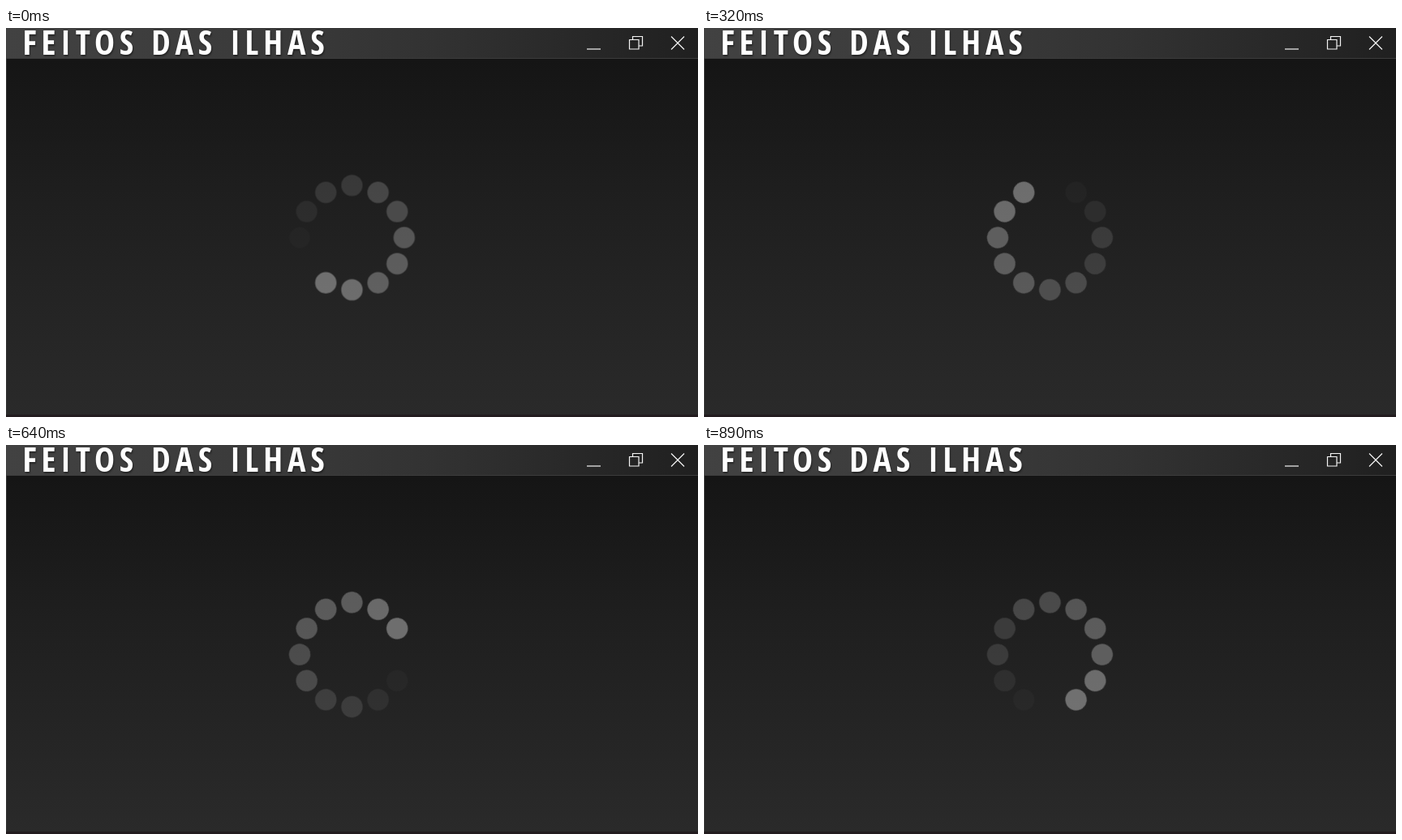
Animation of 853x480 px, one loop 1.02 s. Source, as an HTML page:

```html
<!DOCTYPE html>
<html lang="pt">
<head>
<meta charset="utf-8">
<title>Carregando</title>
<style>
  html, body { margin: 0; width: 100%; height: 100%; overflow: hidden; background: #202020; }
  svg { display: block; width: 853px; height: 480px; }
  #title {
    font: 700 42px "Open Sans Condensed", "Open Sans", "Noto Sans", sans-serif;
    font-stretch: 75%;
    fill: #fff;
    text-shadow: 1px 2px 2px rgba(0, 0, 0, .4);
  }
  .icons { fill: none; stroke: #f4f4f4; stroke-width: 1.2; }
  #ring { fill: #fff; transform-origin: 0 0; animation: spin 1020ms step-end infinite; }
  @keyframes spin {
    0% { transform: rotate(0deg); }
    12.745% { transform: rotate(30deg); }
    25.49% { transform: rotate(90deg); }
    31.372% { transform: rotate(120deg); }
    44.117% { transform: rotate(150deg); }
    50% { transform: rotate(180deg); }
    62.745% { transform: rotate(210deg); }
    68.627% { transform: rotate(240deg); }
    81.372% { transform: rotate(270deg); }
    87.254% { transform: rotate(300deg); }
    100% { transform: rotate(360deg); }
  }
</style>
</head>
<body>
<svg viewBox="0 0 853 480">
  <defs>
    <linearGradient id="body" x2="0" y2="1">
      <stop offset="0" stop-color="#151515"/>
      <stop offset=".4" stop-color="#1f1f1f"/>
      <stop offset="1" stop-color="#2a2a2a"/>
    </linearGradient>
    <linearGradient id="bar">
      <stop offset="0" stop-color="#424242"/>
      <stop offset=".42" stop-color="#393939"/>
      <stop offset=".62" stop-color="#323232"/>
      <stop offset="1" stop-color="#202020"/>
    </linearGradient>
  </defs>
  <rect y="38" width="853" height="442" fill="url(#body)"/>
  <rect width="853" height="38" fill="url(#bar)"/>
  <rect y="37" width="853" height="1" fill="#3c3c3c"/>
  <rect y="38" width="1" height="442" fill="#353535"/>
  <rect y="477" width="853" height="3" fill="#231c1f"/>
  <text id="title" x="20.5" y="33">FEITOS DAS ILHAS</text>
  <g class="icons">
    <path d="M716 26H733"/>
    <path d="M768.5 14.5h11.5v11.5h-11.5zM772.5 14.5v-4h12v11.5h-4.5"/>
    <path d="M820 10.5L836 26.5M836 10.5L820 26.5"/>
  </g>
  <g transform="translate(426.4 258.6)"><g id="ring"></g></g>
</svg>
<script>
  const NS = 'http://www.w3.org/2000/svg';
  const ring = document.getElementById('ring');
  const title = document.getElementById('title');

  // Opacity of each dot, from the head of the trail to its tail
  const trail = [.35, .335, .275, .265, .245, .192, .182, .12, .114, .06, .02];
  trail.forEach((alpha, age) => {
    const angle = (7 - age) * Math.PI / 6;
    const dot = document.createElementNS(NS, 'circle');
    dot.setAttribute('cx', 64.4 * Math.sin(angle));
    dot.setAttribute('cy', -64.4 * Math.cos(angle));
    dot.setAttribute('r', 13.2);
    dot.setAttribute('opacity', alpha);
    ring.append(dot);
  });

  // Even tracking across the heading area
  const gaps = title.textContent.length - 1;
  title.style.letterSpacing = (372 - title.getComputedTextLength()) / gaps + 'px';
</script>
</body>
</html>
```
